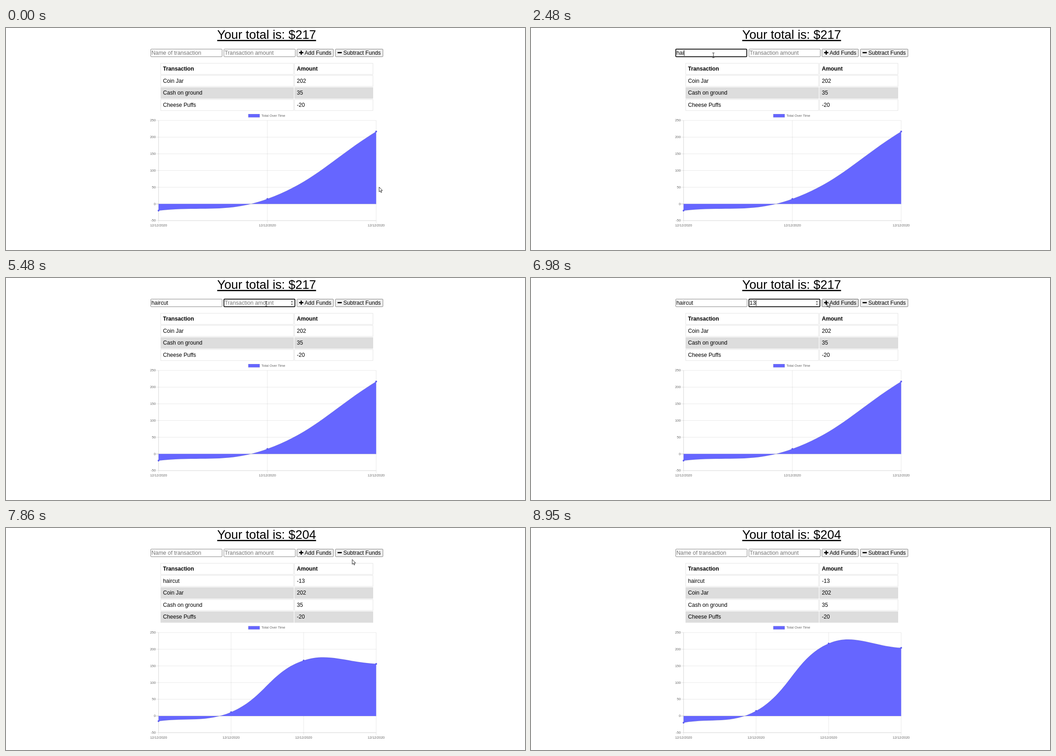
These frames come from a looping animation (1142 px wide and 490 px high, 9280 ms). An HTML page:

```html
<!DOCTYPE html>
<html lang="en">
<head>
<meta charset="utf-8">
<title>Budget tracker</title>
<style>
  html, body { margin: 0; width: 100%; height: 100%; overflow: hidden; background: #fff; }
  svg { display: block; width: 100%; height: 100%; font-family: "Liberation Sans", Arial, sans-serif; }
  .total { font-size: 27.3px; text-decoration: underline; text-anchor: middle; }
  .field { font-size: 12.25px; }
  .cell { font-size: 12.15px; }
  .head { font-weight: bold; }
  .tick { font-size: 7.5px; fill: #666; }
</style>
</head>
<body>
<svg id="stage" viewBox="0 0 1142 490"></svg>
<script>
const LOOP = 9280;
const STEP = 110, PHASE = 40;   // the pointer and the chart move in steps
const BLINK = 490;
const BLUE = '#6666ff';
const NAME_FOCUS = 970, AMOUNT_FOCUS = 4950, PRESS = 7550;
const GROW = 7546, SAVED = 7650, CLEARED = 7770;

// pointer way points: time, x, y
const PATH = [
  [40, 821, 351], [700, 440, 36], [920, 394, 56], [1030, 401.3, 60.3], [4050, 401.3, 60.3],
  [4220, 640, 48], [4440, 635.3, 48], [4700, 575, 57], [6700, 568, 57], [6970, 651.7, 53],
  [7410, 753, 53], [7630, 753, 53], [8070, 770.7, 86], [8620, 1058, 446], [8840, 1097, 482], [8950, 1150, 500]
];
const NAME = { word: 'haircut', focus: NAME_FOCUS, keys: [1930, 2050, 2480, 2700, 3160, 3250, 3490] };
const AMOUNT = { word: '13', focus: AMOUNT_FOCUS, keys: [5780, 5900] };

const stage = document.getElementById('stage');

function el(parent, tag, attrs, text) {
  const node = document.createElementNS('http://www.w3.org/2000/svg', tag);
  set(node, attrs);
  if (text !== undefined) node.textContent = text;
  parent.appendChild(node);
  return node;
}
function set(node, attrs) {
  for (const key in attrs) node.setAttribute(key, attrs[key]);
}
function show(node, on) {
  node.style.display = on ? '' : 'none';
}
function box(parent, x, y, width, height, attrs) {
  return el(parent, 'rect', { x, y, width, height, ...attrs });
}
function label(parent, x, y, cls, text, attrs) {
  return el(parent, 'text', { x, y, class: cls, ...attrs }, text);
}

// form controls
function makeField(x, hint, entry) {
  const frame = box(stage, x, 46.6, 157, 16.8, { rx: 1.4, fill: '#fff' });
  const text = label(stage, x + 1.5, 59.2, 'field', hint);
  const caret = box(stage, x + 2, 49, 1, 12.6);
  return (t, focused) => {
    const typed = entry.keys.filter(k => k <= t);
    const value = t < CLEARED ? entry.word.slice(0, typed.length) : '';
    const last = typed.length ? typed[typed.length - 1] : entry.focus;
    const lit = Math.floor((t - last) / BLINK) % 2 === 0;

    set(frame, focused
      ? { width: 156.2, stroke: '#000', 'stroke-width': 1.7 }
      : { width: 157, stroke: '#767676', 'stroke-width': 0.9 });
    text.textContent = value || hint;
    text.setAttribute('fill', value ? '#000' : '#757575');
    show(caret, focused && lit);
    caret.setAttribute('x', x + 1.7 + (value ? text.getComputedTextLength() : 0));
  };
}
function makeButton(x, width, text, textX, plus) {
  const frame = box(stage, x, 46.6, width, 16.8, { rx: 1.4, 'stroke-width': 0.9 });
  const mid = x + 9.4;
  box(stage, mid - 4.7, 53.1, 9.4, 2.6, { rx: 0.7 });
  if (plus) box(stage, mid - 1.3, 49.7, 2.6, 9.4, { rx: 0.7 });
  label(stage, textX, 59.2, 'cell', text);
  return hover => set(frame, hover ? { fill: '#e5e5e5', stroke: '#4a4a4a' } : { fill: '#efefef', stroke: '#767676' });
}

function makeTable(parent, rows) {
  rows.forEach((row, i) => {
    const y = 77.6 + 26.6 * i;
    const style = { fill: i && i % 2 === 0 ? '#ddd' : '#fff', stroke: '#ddd', 'stroke-width': 0.8 };
    const cls = i ? 'cell' : 'cell head';
    box(parent, 340.4, y + 0.4, 292.6, 24.3, style);
    box(parent, 635, y + 0.4, 172.4, 24.3, style);
    label(parent, 345.5, y + 16.4, cls, row[0]);
    label(parent, 639.9, y + 16.4, cls, row[1]);
  });
}

// smooth curve through the points, tension 0.4
function spline(pts) {
  const handles = pts.map((p, i) => {
    const a = pts[i - 1] || p, b = pts[i + 1] || p;
    const da = Math.hypot(p.x - a.x, p.y - a.y), db = Math.hypot(b.x - p.x, b.y - p.y);
    const ka = 0.4 * da / (da + db), kb = 0.4 * db / (da + db);
    const dx = b.x - a.x, dy = b.y - a.y;
    return { into: [p.x - ka * dx, p.y - ka * dy], out: [p.x + kb * dx, p.y + kb * dy] };
  });
  return pts.slice(1).map((p, i) => [handles[i].out, handles[i + 1].into, [p.x, p.y]]);
}

function makeChart(parent, values, shift) {
  const left = 335.7, right = 814.5, unit = 0.7367;
  const g = el(parent, 'g', { transform: `translate(0 ${shift})` });
  const zero = 388.3, bottom = zero + 50 * unit, top = zero - 250 * unit;
  const line = (x1, y1, x2, y2, alpha = 0.1) =>
    el(g, 'line', { x1, y1, x2, y2, stroke: '#000', 'stroke-opacity': alpha, 'stroke-width': 0.9 });

  box(g, 533.2, 190, 25, 7.2, { fill: BLUE, stroke: '#000', 'stroke-opacity': 0.1, 'stroke-width': 0.9 });
  label(g, 562, 195.8, 'tick', 'Total Over Time');

  for (let v = -50; v <= 250; v += 50) {
    const y = zero - v * unit;
    line(left - 6, y, right, y, v ? 0.1 : 0.25);
    label(g, 329.4, y + 2.3, 'tick', v, { 'text-anchor': 'end' });
  }
  const pts = values.map((v, i) => ({ x: left + (right - left) * i / (values.length - 1), y: -v * unit }));
  for (const { x } of pts) {
    line(x, top, x, bottom + 6);
    label(g, x, bottom + 13, 'tick', '12/12/2020', { 'text-anchor': 'middle' });
  }
  line(left, top, left, bottom);
  line(left, bottom, right, bottom);

  const area = el(g, 'path', { fill: BLUE });
  const edge = el(g, 'path', { fill: 'none', stroke: '#000', 'stroke-opacity': 0.1 });
  const dots = pts.map(p => el(g, 'circle', { cx: p.x, r: 2, fill: '#5c5cee' }));
  const curve = spline(pts);

  return grow => {
    const pos = ([x, y]) => `${x.toFixed(2)},${(zero + y * grow).toFixed(2)}`;
    const d = `M${pos([left, pts[0].y])}` + curve.map(c => 'C' + c.map(pos).join(' ')).join('');
    area.setAttribute('d', `${d}L${right},${zero}L${left},${zero}Z`);
    edge.setAttribute('d', d);
    dots.forEach((dot, i) => dot.setAttribute('cy', zero + pts[i].y * grow));
  };
}

const total = label(stage, 573.5, 24.3, 'total', '');
const drawName = makeField(318.5, 'Name of transaction', NAME);
const drawAmount = makeField(479.5, 'Transaction amount', AMOUNT);
const spinner = el(stage, 'path', {
  d: 'M626.8 53.4l2.3-2.9 2.3 2.9zM626.8 56.8l2.3 2.9 2.3-2.9z', fill: '#505050'
});
const drawAdd = makeButton(640.2, 80.2, 'Add Funds', 657, true);
const drawSub = makeButton(724.8, 104.6, 'Subtract Funds', 742.2, false);

const HEAD = ['Transaction', 'Amount'];
const ROWS = [['Coin Jar', '202'], ['Cash on ground', '35'], ['Cheese Puffs', '-20']];
const before = el(stage, 'g', {}), after = el(stage, 'g', {});
makeTable(before, [HEAD, ...ROWS]);
makeTable(after, [HEAD, ['haircut', '-13'], ...ROWS]);
makeChart(before, [-20, 15, 217], 0)(1);
const growChart = makeChart(after, [-20, 15, 217, 204], 26.6);

const arrow = el(stage, 'path', {
  d: 'M0 0V10.6L2.4 8.4L4.1 12.2L5.8 11.5L4.1 7.8H7.4Z',
  fill: '#fff', stroke: '#111', 'stroke-width': 0.9, 'stroke-linejoin': 'round'
});
const beam = el(stage, 'path', {
  d: 'M-2.5 -5.3H2.5M0 -5.3V5.3M-2.5 5.3H2.5', fill: 'none', stroke: '#222', 'stroke-width': 0.9
});

function pointerAt(t) {
  const i = PATH.findIndex(p => p[0] > t);
  if (i < 1) return PATH[i < 0 ? PATH.length - 1 : 0].slice(1);
  const [t0, x0, y0] = PATH[i - 1], [t1, x1, y1] = PATH[i];
  const k = (t - t0) / (t1 - t0);
  return [x0 + (x1 - x0) * k, y0 + (y1 - y0) * k];
}
function controlAt(x, y) {
  if (y < 46 || y > 64 || x < 318 || x > 830) return null;
  return x < 478 ? 'name' : x < 634 ? 'amount' : x < 722 ? 'add' : 'sub';
}

function draw(t) {
  const step = Math.floor((t - PHASE) / STEP) * STEP + PHASE;
  const [x, y] = pointerAt(step);
  const over = controlAt(x, y);
  const inName = t >= NAME_FOCUS && t < AMOUNT_FOCUS;
  const inAmount = t >= AMOUNT_FOCUS && t < PRESS;
  const saved = t >= SAVED;

  total.textContent = 'Your total is: $' + (saved ? 204 : 217);
  drawName(t, inName);
  drawAmount(t, inAmount);
  show(spinner, inAmount || over === 'amount');
  drawAdd(over === 'add');
  drawSub(over === 'sub');

  show(before, !saved);
  show(after, saved);
  if (saved) growChart(1 - Math.pow(1 - Math.min(1, (step - GROW) / 1000), 4));

  const typing = over === 'name' || over === 'amount';
  show(beam, typing);
  show(arrow, !typing);
  set(typing ? beam : arrow, { transform: `translate(${x} ${y})` });
}

const start = performance.now();
function tick() {
  draw((performance.now() - start) % LOOP);
  requestAnimationFrame(tick);
}
tick();
</script>
</body>
</html>
```
